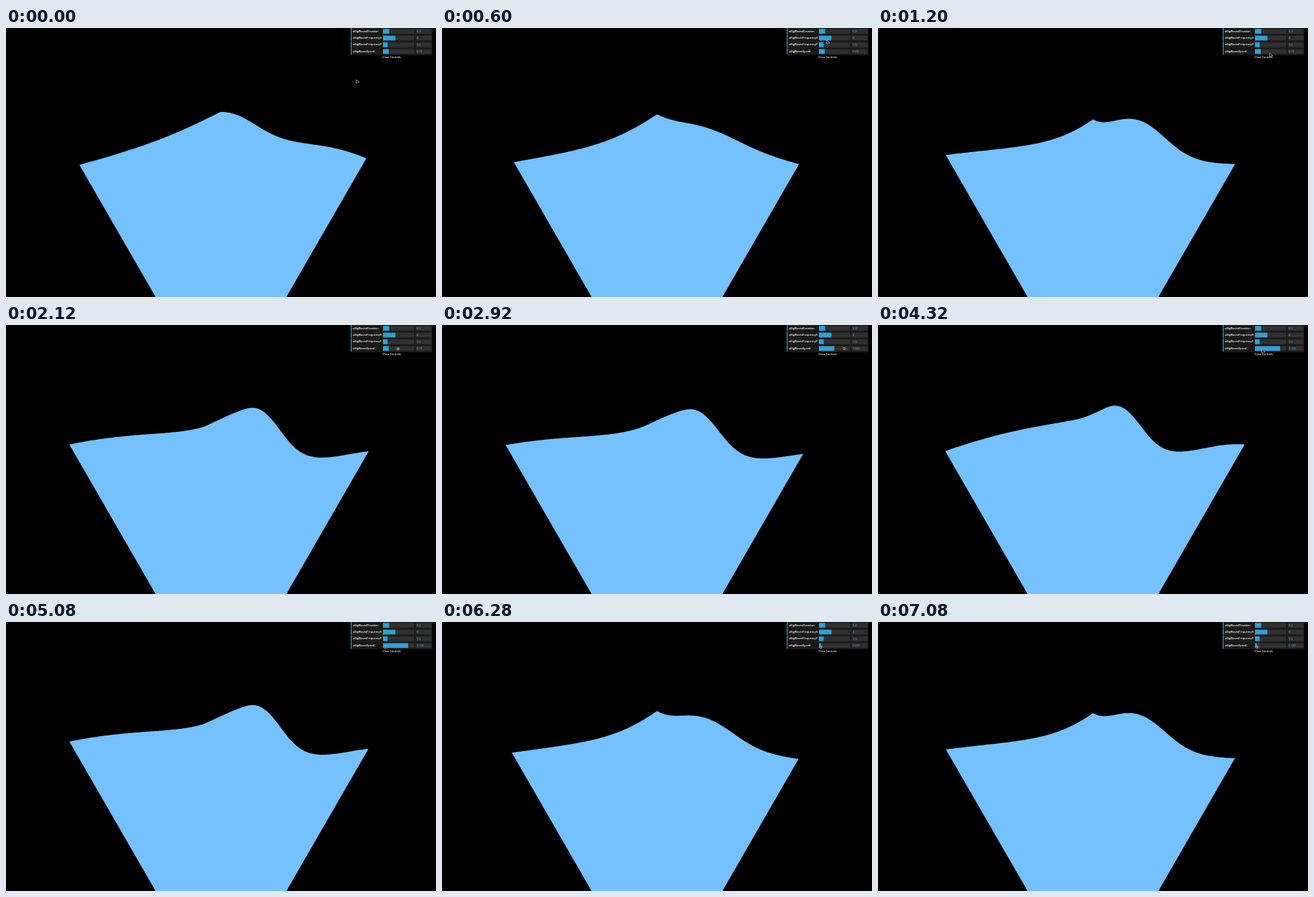
An HTML page with a canvas that plays this animation: 600x375 px, repeating every 7.12 s.

```html
<!DOCTYPE html>
<html lang="en">
<meta charset="utf-8">
<title>Wave plane with controls</title>
<style>
  html, body { margin: 0; width: 100%; height: 100%; overflow: hidden; background: #000; }
  canvas { display: block; width: 600px; height: 375px; }
</style>
<canvas id="stage"></canvas>
<script>
const W = 600, H = 375, LOOP = 7120, STEP = 40;
const canvas = document.getElementById('stage');
const ctx = canvas.getContext('2d');
const ratio = window.devicePixelRatio || 1;
canvas.width = W * ratio;
canvas.height = H * ratio;

const FOCAL = H / 2 / Math.tan(75 / 2 * Math.PI / 180);
const CLOCK_START = 1.625; // the wave has already run this many seconds
const BLUE = '#2fa1d6';
const FONT = 'px "Open Sans", "Noto Sans", sans-serif';

// Pointer stops: seconds, x, y
const POINTER = [
  [0, 489, 72], [0.7, 545, 8], [0.95, 574, 22], [1.2, 547, 35],
  [2.3, 547, 33], [3.3, 570, 33], [4.32, 536, 34], [5.08, 529, 35]
];

// Each click on the slider sets a new speed
function speedAt(t) {
  return t < 2.3 ? 0.75 : t < 3.85 ? 1.965 : t < 5.3 ? 3.226 : 0.241;
}

function pointerAt(t) {
  const next = POINTER.findIndex(stop => stop[0] > t);
  if (next < 0) return POINTER[POINTER.length - 1].slice(1);
  const [t0, x0, y0] = POINTER[next - 1], [t1, x1, y1] = POINTER[next];
  const k = (t - t0) / (t1 - t0);
  return [x0 + (x1 - x0) * k, y0 + (y1 - y0) * k];
}

// Camera at (1, 1, 1) looking at the origin; takes a direction from the camera
function project(x, y, z) {
  const scale = FOCAL * Math.sqrt(3) / -(x + y + z);
  return [W / 2 + scale * (x - z) / Math.SQRT2, H / 2 - scale * (2 * y - x - z) / Math.sqrt(6)];
}

function elevation(x, z, phase) {
  return 0.2 * Math.sin(4 * x + phase) * Math.sin(1.5 * z + phase);
}

function drawWave(phase) {
  ctx.fillStyle = '#74c1fd';
  ctx.beginPath();
  ctx.moveTo(...project(0, -1, 0));
  // Horizon of the sheet: the steepest sight line in each direction
  for (let i = 0; i <= 180; i++) {
    const angle = i / 180 * Math.PI / 2, c = Math.cos(angle), s = Math.sin(angle);
    const reach = 2 / Math.max(c, s);
    let slope = -Infinity;
    for (let j = 30; j <= 120; j++) {
      const r = reach * j / 120;
      slope = Math.max(slope, (elevation(1 - r * c, 1 - r * s, phase) - 1) / r);
    }
    ctx.lineTo(...project(-c, slope, -s));
  }
  ctx.fill();
}

function rect(color, x, y, w, h) {
  ctx.fillStyle = color;
  ctx.fillRect(x, y, w, h);
}

function label(text, x, y, color, size = 3.7, align = 'left') {
  ctx.font = '600 ' + size + FONT;
  ctx.textBaseline = 'middle';
  ctx.textAlign = align;
  ctx.fillStyle = color;
  ctx.fillText(text, x, y);
}

function drawRow(index, name, value, max) {
  const h = 9.4, y = index * h;
  rect('#1a1a1a', 481, y, 114, h);
  rect('#2c2c2c', 481, y + h - 0.35, 114, 0.35);
  rect(BLUE, 481, y, 1.1, h - 0.35);
  rect('#303030', 526, y + 1.3, 43.5, 6.6);
  rect(BLUE, 526, y + 1.3, 43.5 * value / max, 6.6);
  rect('#303030', 571.5, y + 1.3, 22.3, 6.6);
  label(name, 484, y + 4.7, '#fff');
  label(value, 573, y + 4.8, BLUE, 4);
}

function drawPanel(speed) {
  drawRow(0, 'uBigWavesElevation', 0.2, 1);
  drawRow(1, 'uBigWavesFrequencyX', 4, 10);
  drawRow(2, 'uBigWavesFrequencyY', 1.5, 10);
  drawRow(3, 'uBigWavesSpeed', speed, 4);
  label('Close Controls', 538, 41, '#fff', 3.7, 'center');
}

function drawPointer(t) {
  const [x, y] = pointerAt(t);
  const overSlider = t > 1.5 && t < 4.1 || t > 4.7;
  const shape = overSlider
    ? 'M-.5-1.4L-2.2 0L-.5 1.4ZM.5-1.4L2.2 0L.5 1.4Z'
    : 'M0 0V5L1.4 3.8H3.5Z';
  const path = new Path2D(shape);
  ctx.save();
  ctx.translate(x, y);
  ctx.lineWidth = 0.9;
  ctx.strokeStyle = '#fff';
  ctx.fillStyle = '#111';
  ctx.stroke(path);
  ctx.fill(path);
  ctx.restore();
}

function draw(now) {
  const t = Math.floor(now % LOOP / STEP) * STEP / 1000;
  const speed = speedAt(t);
  ctx.setTransform(ratio, 0, 0, ratio, 0, 0);
  rect('#000', 0, 0, W, H);
  drawWave((CLOCK_START + t) * speed);
  drawPanel(speed);
  drawPointer(t);
}

const start = performance.now();
function loop() {
  draw(performance.now() - start);
  requestAnimationFrame(loop);
}
loop();
</script>
</html>
```
